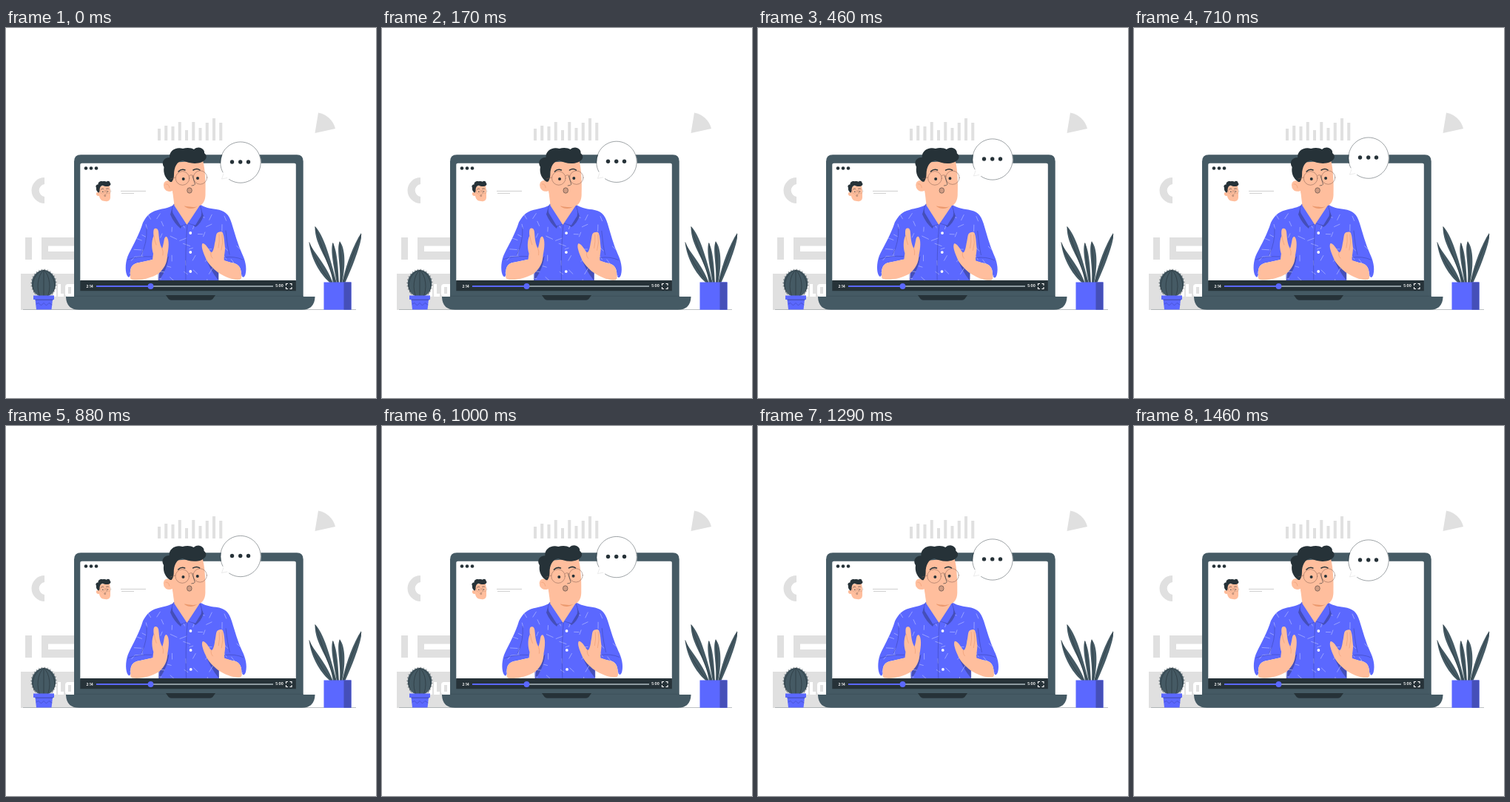
An HTML page for the animation above (1.5 s loop, 500 px wide and 500 px high).

```html
<!DOCTYPE html>
<html lang="en">
<head>
<meta charset="utf-8">
<style>
  html, body { margin: 0; height: 100%; overflow: hidden; background: #fff; }
  svg { display: block; width: 100%; height: 100%; }
  text { font: 700 4.5px Inter, sans-serif; fill: #fff; }
  .grey { fill: #e0e0e0; }
  .slate { fill: #455a64; }
  .dark { fill: #263238; }
  .blue { fill: #5b68ff; }
  .navy { fill: #454fb9; }
  .skin { fill: #ffbe9d; }
  .white { fill: #fff; }
  .line { fill: none; stroke: #263238; stroke-width: .6; stroke-linecap: round; stroke-linejoin: round; }
  .seam { stroke: #3f49b5; }
  .crease { stroke: #eb996e; }
</style>
</head>
<body>
<svg viewBox="0 0 500 500">
  <defs>
    <path id="shirtShape" d="M228 238C222 243 212 244 205 246C193 249 189 256 185 263C180 279 172 293 166 305C161 315 161 327 163 333Q166 340 168 334C167 322 172 318 180 317L208 311L206 345H287L286 312L304 317C313 318 318 322 318 334Q321 340 323.500 333C326 324 323 313 319 305C313 292 309 277 305 264C301 251 296 247 284 245C275 244 267 242 262 238Z"/>
    <clipPath id="shirtClip"><use href="#shirtShape"/></clipPath>
  </defs>

  <!-- backdrop -->
  <g class="grey">
    <g id="bars"></g>
    <path d="M417.500 142L422 114.500A29 29 0 0 1 445 136Z"/>
    <path d="M52 202A17.500 17.500 0 0 0 52 237V228A8.600 8.600 0 0 1 52 211Z"/>
    <path d="M26 283h9v30h-9zM48 283h46v11.500H57v7.500h37v11H48z"/>
    <path d="M20 332h74v49H20z"/>
  </g>
  <path class="white" d="M64 346h4v17h-4zM70 346h4v13h4v4h-8zM84 346h8v17h-8q-4 0-4-4v-9q0-4 4-4z"/>
  <path class="grey" d="M84 350h4v9h-4z"/>
  <path d="M23 380.500H473" stroke="#8f979b" stroke-width=".6"/>

  <!-- cactus -->
  <ellipse class="slate" cx="51" cy="345.300" rx="16.300" ry="18.200"/>
  <path class="line" d="M51 327V363M51 327C42 334 41 354 46 363M51 327C60 334 61 354 56 363M48 328C34 335 34 354 40 360M54 328C68 335 68 354 62 360"/>
  <g id="spines" class="line"></g>
  <path class="blue" d="M37 361.500H65V367H63L61.500 380.600H41L39.500 367H37Z"/>
  <path class="navy" d="M39.500 366.700H63.500V368H39.700Z"/>
  <path class="line seam" d="M41 373L44 371.500L47.500 375L51 371.500L54.500 375L58 371.500L62 374"/>

  <!-- house plant -->
  <g class="slate">
    <path d="M439 345C427 336 412 314 409.500 289C417 306 432 318 442 345Z"/>
    <path d="M442 345C438 312 417 296 417.500 268C429 279 438 310 447 345Z"/>
    <path d="M447 345C443 322 438 301 441.500 290C447 299 449 322 450 345Z"/>
    <path d="M451 345C453 322 446 298 451 288.500C459 298 459 323 454 345Z"/>
    <path d="M454 345C460 318 470 292 480 277V284C477 300 467 325 458 345Z"/>
    <path class="line" d="M410 290Q418 318 440 344M418 269Q428 301 445 344M442 291Q444 318 449 344M451 289Q454 320 453 344M480 279Q467 308 456 344"/>
  </g>
  <path class="blue" d="M429.500 343.500H466.500V380.700H429.500Z"/>
  <path class="navy" d="M456.500 343.500H466.500V380.700H456.500Z"/>

  <!-- laptop -->
  <path class="slate" d="M92 364V180.300Q92 171.300 101 171.300H393Q401.700 171.300 401.700 180.300V364Z"/>
  <path class="slate" d="M81 363H417.500V364Q416.500 380.700 400 380.700H98.500Q82 380.700 81 364Z"/>
  <path d="M92 362.300H402" stroke="#3a4c55" stroke-width=".6"/>
  <path class="dark" d="M216 361H283L279.500 366Q278 367.700 276 367.700H223Q221 367.700 219.500 366Z"/>
  <rect class="white" x="100.300" y="182.700" width="291.500" height="160" rx="2"/>
  <g class="dark">
    <circle cx="108" cy="189.500" r="2.300"/><circle cx="115" cy="189.500" r="2.300"/><circle cx="122" cy="189.500" r="2.300"/>
  </g>
  <use href="#head" transform="translate(49.400 151.900) scale(.34)"/>
  <path d="M155 220.400H189M156 223.400H173" stroke="#a9a9a9" stroke-width=".6"/>

  <!-- speaker -->
  <g id="man">
    <use href="#shirtShape" class="blue"/>
    <path class="navy" d="M206 345L208 322L220 308Q218 326 207 341ZM287 345V328L269 308Q275 326 287 341Z"/>
    <g clip-path="url(#shirtClip)"><g id="dashes" stroke="#c0c6ff" stroke-width=".6" stroke-linecap="round"></g></g>
    <path class="navy" d="M224 245L222 252Q227 264 236 271L240 262ZM263 243L267 254Q263 265 256 269L249 263Z"/>
    <path class="blue line seam" style="fill:#5b68ff" d="M227 238Q223 243 225 250L236 268L245 265ZM261 238Q266 247 264 254L256 267L246 264Z"/>
    <path class="skin" d="M225 220L227.500 240L244.500 266L261 241V225Z"/>
    <path class="crease" d="M239 235Q248 243 258 241Q250 246 242 241Z" fill="#eb996e"/>
    <path class="line seam" d="M245 266Q242 300 243 341M206 312V341M287 314V341M190 270Q191 290 183 306M297 274Q299 294 302 306M165 313Q178 308 197 309M320 313Q309 308 295 310"/>
    <g class="white">
      <circle cx="249.300" cy="277" r="1.900"/><circle cx="249.300" cy="303" r="1.900"/><circle cx="249.300" cy="329" r="1.900"/>
    </g>

    <path class="skin" d="M203 271C199 270 199 275 199.500 281C196 289 197 299 199 305L198 313L180 317C172 318 167 322 168 334Q167 339 170 340C181 342 196 338 206 332C213 326 218 318 218 307C220 298 221 286 217 282C213 281 214 290 211 298C207 291 207 284 206 275Q205 271 203 271Z"/>
    <path class="skin" d="M287 276C283 277 284 284 282 291C281 299 279 304 277 303C273 298 270 291 265.500 291C263 295 267 304 269 309C272 318 280 325 286 330C297 337 307 341 316 340Q319 339 318 334C318 322 313 318 304 317L295 314C294 310 296 304 296 297C295 289 295 282 293 277C291 274 289 276 287 276Z"/>
    <path class="line crease" d="M200 281Q201 288 203 293M211 298Q213 302 212 307M288 279Q289 289 287 297M292 279Q294 290 291 300M277 303Q276 308 279 311"/>

    <g id="head">
      <path class="skin" d="M224 182L266 179C269 190 270 208 269.500 223C270 237 263 242 253 242C240 241 229 240 225 220Q217 223 213.500 216Q211 207 219 206L223 208Z"/>
      <path class="dark" d="M222 208C216 204 212 197 213.500 188C209 181 214 175 221 175C220 166 230 160 239 163C245 161 251 162 254 164C261 158 269 164 268 169C273 173 271 178 265 181C255 185 246 182 239 179C231 180 227 188 227 198Q227 204 224 208Z"/>
      <path class="line" style="stroke-width:1.500" d="M233 194Q237 190 242 192M253 192Q258 189 262 192"/>
      <circle class="dark" cx="239.700" cy="204" r="2"/><circle class="dark" cx="259" cy="203" r="2"/>
      <g class="line" style="stroke:#7d5a4e;stroke-width:.5">
        <circle cx="238.500" cy="203" r="9.300"/><circle cx="262.500" cy="202" r="9.200"/>
        <path d="M229 202L222 204M247.500 200Q250 197 253.500 200"/>
      </g>
      <path class="line" d="M252 200L255.500 211Q255 213 251 213"/>
      <ellipse cx="248" cy="219.500" rx="3.300" ry="3.700" fill="#d09c83" stroke="#4d423f" stroke-width=".6"/>
      <path class="line crease" d="M216 211Q220 210 221 216"/>
    </g>
  </g>

  <!-- player bar -->
  <path class="dark" d="M100.300 341H391.800V355.500H100.300Z"/>
  <path class="slate" d="M100 355.500H392V360.500H100Z"/>
  <text x="108.500" y="350.600">2:14</text>
  <text x="364.300" y="350.400">5:00</text>
  <path d="M122 349H361" stroke="#b0bec5" stroke-width="1.600"/>
  <path d="M122 349H195" stroke="#5b68ff" stroke-width="2"/>
  <circle class="blue" cx="195.500" cy="349" r="3.900"/>
  <path d="M378.500 348V345.500H381M383.500 345.500H386V348M386 350V352.500H383.500M381 352.500H378.500V350" fill="none" stroke="#fff" stroke-width="1.100"/>

  <!-- speech bubble -->
  <g id="bubble">
    <path class="white" d="M291 190L293.500 199L291 204.500L303 203Z"/>
    <path class="line" style="stroke:#bbb;stroke-width:.3" d="M294 197L291.500 204L299 202.500"/>
    <ellipse class="white" cx="317.500" cy="182" rx="27.300" ry="27.700"/>
    <path class="line" style="stroke-width:.45" d="M301.500 204.500A27.300 27.700 0 1 0 293 195"/>
    <g class="dark">
      <circle cx="305.500" cy="181" r="2.700"/><circle cx="316.700" cy="181" r="2.700"/><circle cx="327.500" cy="181" r="2.700"/>
    </g>
  </g>
</svg>
<script>
  const byId = id => document.getElementById(id);
  const seg = (x, y, angle, length) =>
    `<path d="M${x} ${y}l${length * Math.cos(angle)} ${length * Math.sin(angle)}"/>`;

  byId('bars').innerHTML = [136, 132, 133, 127, 138, 127, 135, 128, 122, 128]
    .map((top, i) => `<rect x="${205 + i * 9.25}" y="${top}" width="4" height="${152 - top}"/>`).join('');

  let spines = '';
  for (let i = 0; i < 20; i++) {
    const a = 2.5 + i * 0.23;
    spines += seg(51 + 16 * Math.cos(a), 345.3 + 18 * Math.sin(a), a, 1.3);
  }
  byId('spines').innerHTML = spines;

  let seed = 7;
  const random = () => (seed = seed * 16807 % 2147483647) / 2147483647;
  let dashes = '';
  for (let y = 246; y < 340; y += 15)
    for (let x = 166; x < 322; x += 17)
      dashes += seg(x + random() * 11, y + random() * 9, random() * Math.PI, 5 + random() * 5);
  byId('dashes').innerHTML = dashes;

  const PERIOD = 1500;
  function draw(now) {
    const phase = now % PERIOD / PERIOD * 2 * Math.PI;
    byId('man').setAttribute('transform', `rotate(${0.6 * Math.sin(phase)} 243 250)`);
    byId('bubble').setAttribute('transform', `translate(0 ${3 * Math.cos(phase) - 3})`);
    requestAnimationFrame(draw);
  }
  draw(performance.now());
</script>
</body>
</html>
```
